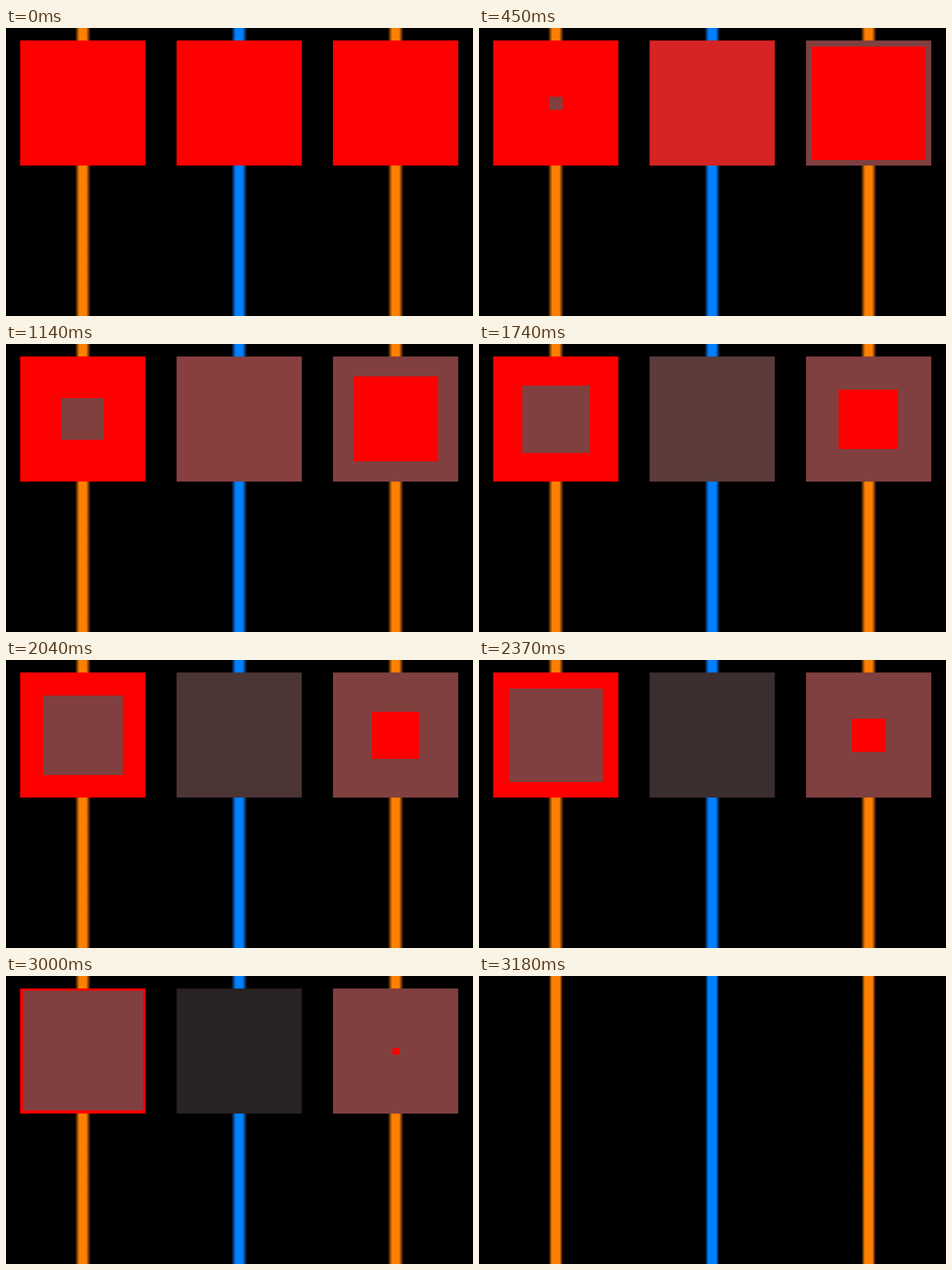
Write an HTML page with a canvas that moves like this. It is 604x373 px and loops after 3.6 s.

```html
<!DOCTYPE html>
<html lang="en">
<head>
<meta charset="utf-8">
<title>Three cooling squares</title>
<style>
  html, body { margin: 0; width: 100%; height: 100%; overflow: hidden; background: #000; }
  canvas { display: block; width: 604px; height: 373px; }
</style>
</head>
<body>
<canvas id="stage" width="604" height="373"></canvas>
<script>
const ctx = document.getElementById('stage').getContext('2d');
const LOOP = 3600, TICK = 30, START = 240, END = 3180, ORIGIN = 180;
const SIZE = 162, TOP = 16.2, LEFT = 18.3, PITCH = 202.3;
const MID_Y = TOP + SIZE / 2;
const SPEED = 0.0272;    // px per ms, for each side
const COOLING = 6.57e-4; // decay per ms
const RED = '#f00', ASH = 'rgb(128,64,64)';
const RODS = ['255,128,0', '0,128,255', '255,128,0'];

const leftOf = i => LEFT + PITCH * i;
const midOf = i => leftOf(i) + SIZE / 2;

function rod(i, core, reach) {
  const mid = midOf(i);
  const fade = ctx.createLinearGradient(mid - reach, 0, mid + reach, 0);
  const edge = (reach - core) / (2 * reach);
  const stop = (at, alpha) => fade.addColorStop(at, `rgba(${RODS[i]},${alpha})`);
  stop(0, 0);
  stop(edge, 1);
  stop(1 - edge, 1);
  stop(1, 0);
  ctx.fillStyle = fade;
  ctx.fillRect(mid - reach, 0, 2 * reach, 373);
}

function square(i, color) {
  ctx.fillStyle = color;
  ctx.fillRect(leftOf(i), TOP, SIZE, SIZE);
}

function core(i, half, color) {
  if (half <= 0) return;
  const x = Math.round(midOf(i) - half), y = Math.round(MID_Y - half);
  const side = Math.round(2 * half);
  ctx.fillStyle = color;
  ctx.fillRect(x, y, side, side);
}

// Saturation and brightness fall together.
function heatColor(heat) {
  const dim = 255 * heat * (1 - heat);
  return `rgb(${Math.round(255 * heat)},${Math.round(dim)},${Math.round(dim)})`;
}

function draw(t) {
  ctx.fillStyle = '#000';
  ctx.fillRect(0, 0, 604, 373);
  const bare = t >= END;
  for (let i = 0; i < 3; i++) rod(i, bare ? 5 : 4.5, bare ? 9 : 10);
  if (bare) return;

  const active = t >= START;
  const age = active ? t - ORIGIN : 0;
  const front = SPEED * age;
  square(0, RED);
  if (active) core(0, Math.min(front + 1, SIZE / 2), ASH);
  square(1, heatColor(Math.exp(-COOLING * age)));
  square(2, active ? ASH : RED);
  if (active) core(2, SIZE / 2 - front, RED);
}

const begin = performance.now();
function frame() {
  const t = (performance.now() - begin) % LOOP;
  draw(Math.floor(t / TICK) * TICK);
  requestAnimationFrame(frame);
}
frame();
</script>
</body>
</html>
```
